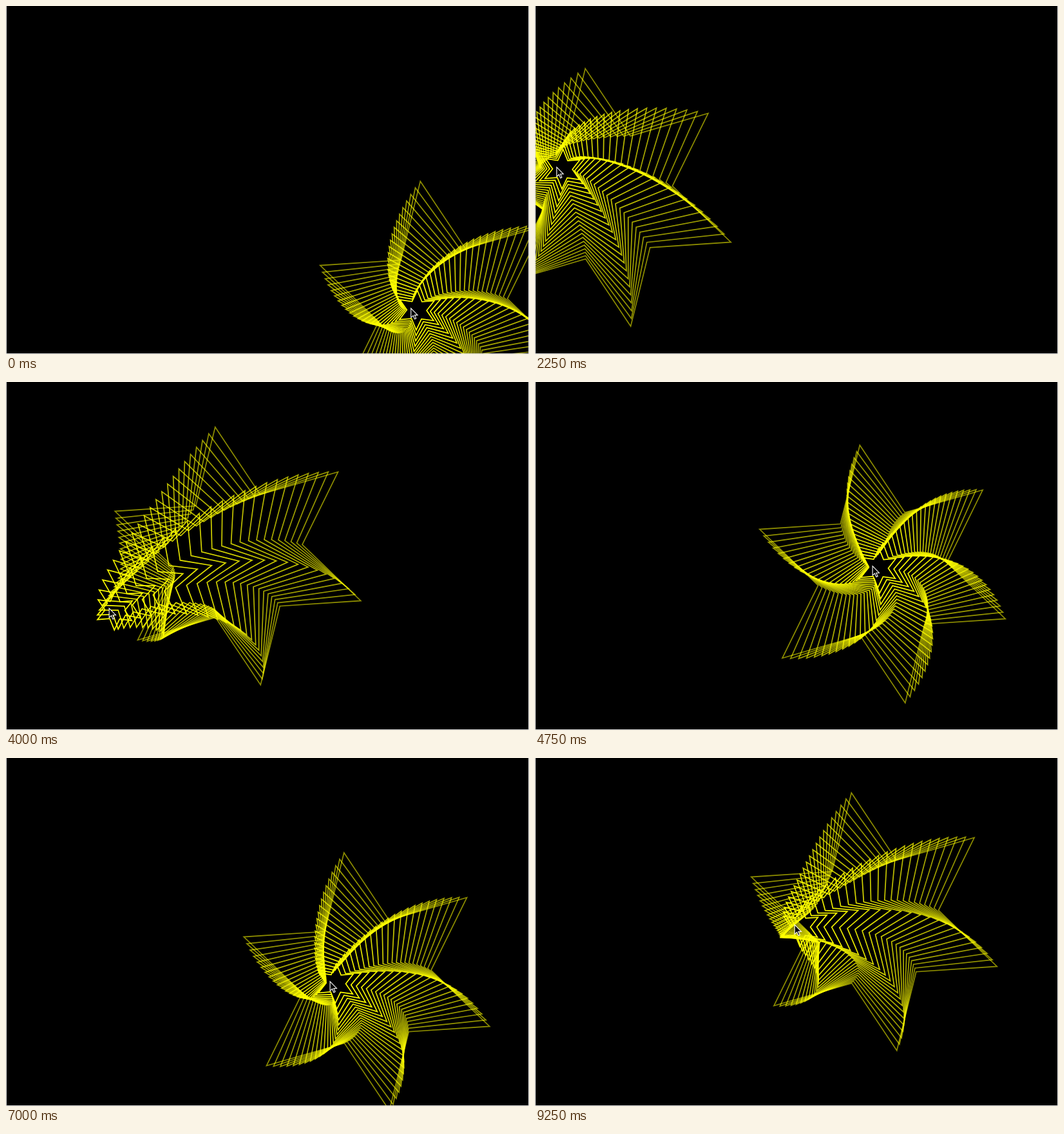
Recreate the animation shown at these times as an HTML page with a canvas. Size 812 by 540 pixels, loop 9.5 s.

```html
<!DOCTYPE html>
<html lang="en">
<head>
<meta charset="utf-8">
<title>Star trail</title>
<style>
  html, body { margin: 0; width: 100%; height: 100%; overflow: hidden; background: #000; }
  canvas { display: block; width: 812px; height: 540px; }
</style>
</head>
<body>
<canvas id="stage" width="812" height="540"></canvas>
<script>
const ctx = document.getElementById('stage').getContext('2d');
const LOOP = 9500, HOLD = 250, COUNT = 22, DT = 2;

// Key points of the largest star's path: time, x, y
const keys = [
  [-1100, 755, 420], [-700, 748, 452], [-300, 716, 471], [0, 678.5, 472],
  [300, 663, 473], [700, 645, 463], [1000, 530, 449], [1250, 449, 439],
  [1500, 405, 428], [2000, 170, 330], [2500, 105, 278], [2750, 235, 301],
  [3000, 372, 313], [3250, 484.5, 304.5], [3500, 535, 272], [3750, 530, 212],
  [4000, 360, 270], [4250, 482, 316], [4500, 537, 305], [4750, 539.5, 298],
  [5000, 502, 293], [5400, 440, 340], [5800, 490, 350], [6250, 574, 318],
  [6700, 595, 341], [7000, 560, 347], [7300, 511, 335], [7500, 500, 280],
  [7750, 640, 208], [8000, 515, 212], [8250, 424.5, 262], [8350, 420, 282],
  [8600, 610, 290], [8900, 645, 248], [9250, 526.5, 254], [9500, 510, 250]
];

function slope(i, axis) {
  const a = keys[Math.max(i - 1, 0)], b = keys[Math.min(i + 1, keys.length - 1)];
  return (b[axis] - a[axis]) / (b[0] - a[0]);
}

// Smooth curve through the key points
function path(t, axis) {
  let i = 0;
  while (i < keys.length - 2 && t > keys[i + 1][0]) i++;
  const p = keys[i], q = keys[i + 1];
  const h = q[0] - p[0], u = (t - p[0]) / h, v = 1 - u;
  return v * v * (1 + 2 * u) * p[axis] + u * u * (1 + 2 * v) * q[axis]
    + h * u * v * (v * slope(i, axis) - u * slope(i + 1, axis));
}

// Smaller stars (higher k) react faster
const delay = k => (26 - k) * 1000 / 60;

// The point all stars chase so that the largest one stays on the path
const goal = (t, axis) =>
  path(t, axis) + delay(0) * (path(t + 1, axis) - path(t - 1, axis)) / 2;

function simulate() {
  const begin = keys[0][0], poses = [];
  const stars = Array.from({ length: COUNT }, () => keys[0].slice(1));
  for (let t = begin; t < LOOP; t += DT) {
    if (t >= 0 && t % HOLD === 0) poses.push(stars.map(s => [...s]));
    const aim = [goal(t + DT / 2, 1), goal(t + DT / 2, 2)];
    stars.forEach((s, k) => {
      const gain = 1 - Math.exp(-DT / delay(k));
      s[0] += (aim[0] - s[0]) * gain;
      s[1] += (aim[1] - s[1]) * gain;
    });
  }
  return poses;
}

function drawStar([x, y], k) {
  const radius = 203 - 8.2 * k, turn = -100 - 2.3 * k;
  ctx.beginPath();
  for (let i = 0; i < 12; i++) {
    const a = (turn + 30 * i) * Math.PI / 180;
    const r = i % 2 ? radius / 2 : radius;
    ctx.lineTo(x + r * Math.cos(a), y + r * Math.sin(a));
  }
  ctx.closePath();
  ctx.strokeStyle = `rgba(255,255,0,${0.55 + 0.45 * k / (COUNT - 1)})`;
  ctx.stroke();
}

const arrow = new Path2D('M0 0V14.5L3.4 11.4L5.8 16.8L8 15.8L5.7 10.6H10.3Z');

function drawPointer([x, y]) {
  ctx.save();
  ctx.translate(x - 9, y - 3);
  ctx.fillStyle = '#000';
  ctx.fill(arrow);
  ctx.lineWidth = 1.1;
  ctx.strokeStyle = '#fff';
  ctx.stroke(arrow);
  ctx.restore();
}

function draw(stars) {
  ctx.fillStyle = '#000';
  ctx.fillRect(0, 0, 812, 540);
  ctx.lineWidth = 1.7;
  stars.forEach(drawStar);
  drawPointer(stars[COUNT - 1]);
  ctx.fillStyle = '#ddd';
  ctx.fillRect(0, 0, 1, 540);
  ctx.fillRect(811, 0, 1, 540);
  ctx.fillRect(0, 539, 812, 1);
}

const poses = simulate();
const start = performance.now();
let shown = -1;

function tick() {
  const pose = Math.floor((performance.now() - start) % LOOP / HOLD);
  if (pose !== shown) draw(poses[shown = pose]);
  requestAnimationFrame(tick);
}
tick();
</script>
</body>
</html>
```
